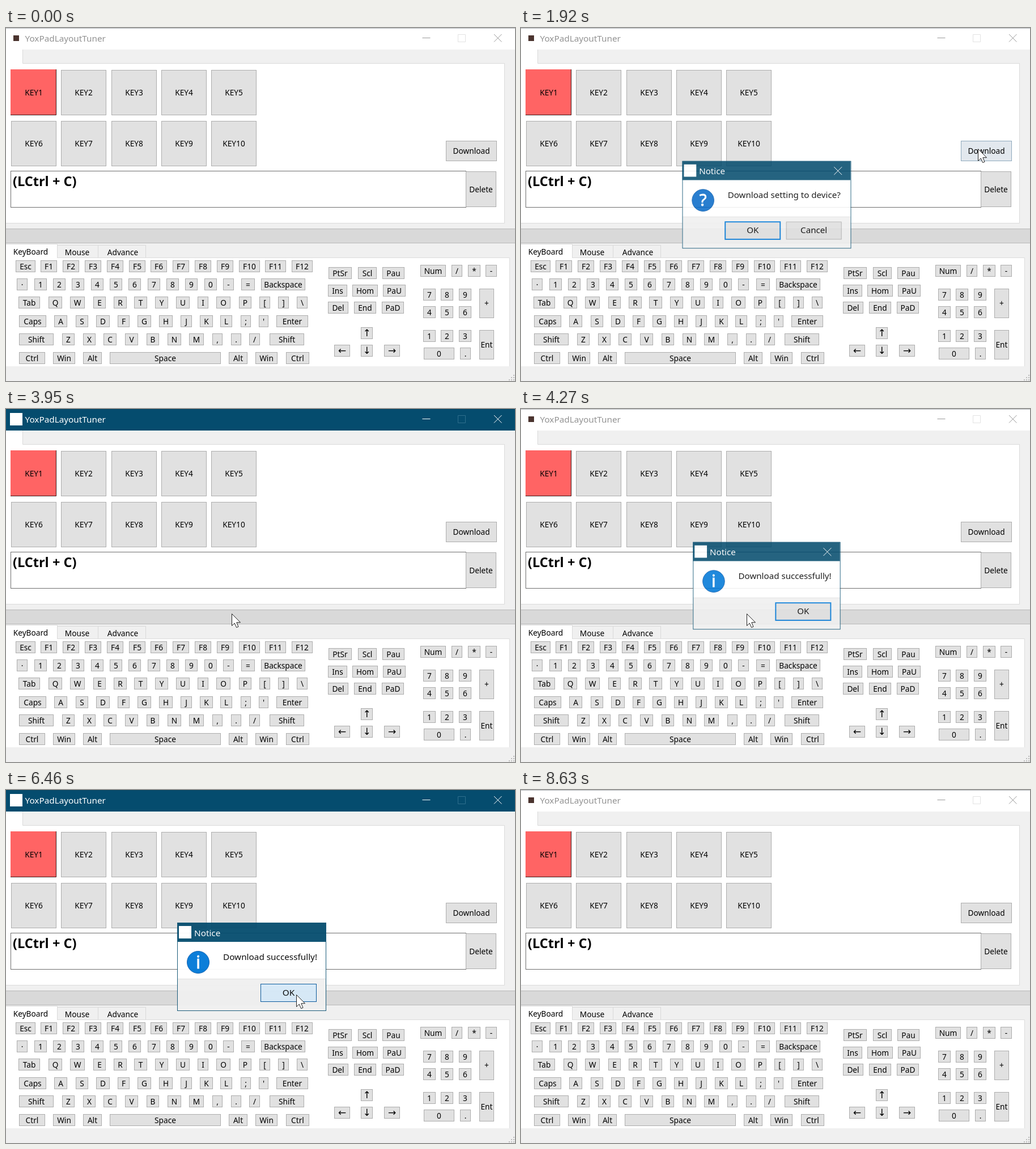
Animation of 898x623 px, one loop 8.72 s. Source, as an HTML page:

```html
<!DOCTYPE html>
<html lang="en">
<head>
<meta charset="utf-8">
<title>YoxPadLayoutTuner</title>
<style>
  html, body { margin: 0; width: 100%; height: 100%; overflow: hidden; background: #f0f0f0; }
  svg { display: block; width: 898px; height: 623px; }
  text { font: 13.7px "Noto Sans", "Open Sans", sans-serif; white-space: pre; }
  .ui { font-size: 15.3px; }
  .mid { text-anchor: middle; }
  .arrow { font: 17px "DejaVu Sans", sans-serif; }
  .entry { font: bold 23.5px "Noto Sans", sans-serif; }
  .sign { font-size: 30px; stroke: #fff; stroke-width: .8px; }
</style>
</head>
<body>
<svg id="stage" viewBox="0 0 898 623"></svg>
<script>
const LOOP = 8720, TICK = 76.6;
const NAVY = '#054c6e', FACE = '#e1e1e1', EDGE = '#adadad';
const stage = document.getElementById('stage');

function add(parent, tag, attrs, content) {
  const node = document.createElementNS('http://www.w3.org/2000/svg', tag);
  set(node, attrs);
  if (content) node.textContent = content;
  return parent.appendChild(node);
}
function set(node, attrs) {
  for (const name in attrs) node.setAttribute(name, attrs[name]);
}
const fillRect = (p, x, y, width, height, fill) => add(p, 'rect', { x, y, width, height, fill });
const box = (p, x, y, width, height, fill = FACE, stroke = EDGE) =>
  add(p, 'rect', { x: x + .5, y: y + .5, width, height, fill, stroke });
const line = (p, d, stroke) => add(p, 'path', { d, stroke, fill: 'none' });
const label = (p, x, y, content, attrs = {}) => add(p, 'text', { x, y, ...attrs }, content);

function button(p, x, y, w, h, content, cls = 'mid') {
  const face = box(p, x, y, w, h);
  label(p, x + w / 2 + .5, y + h / 2 + 5.5, content, { class: cls });
  return { face, x, y, w, h };
}

// Window frame and title bar
const titleBar = fillRect(stage, 0, 0, 898, 38, '#fff');
const topEdge = line(stage, 'M0 .5H898', '#b4b8bb');
const titleIcon = fillRect(stage, 0, 0, 0, 0, '#fff');
const titleText = label(stage, 33.5, 24, 'YoxPadLayoutTuner', { class: 'ui' });
const minClose = line(stage, 'M734.5 17.5H748.5M861 11L874.5 24.5M874.5 11L861 24.5', '#999');
const maximize = line(stage, 'M797.5 11.5H810.5V24.5H797.5Z', '#ddd');

// Upper page
fillRect(stage, 0, 38, 29, 25, '#fff');
fillRect(stage, 0, 62, 879, 282, '#fff');
line(stage, 'M29.5 38V62.5H879.5V344.5H0', '#dadada');
for (let i = 0; i < 10; i++) {
  const x = Math.round(9 + (i % 5) * 88.3), y = i < 5 ? 74 : 164;
  const key = button(stage, x, y, 79, 79, 'KEY' + (i + 1));
  if (i === 0) {
    set(key.face, { x: 8, y: 73, width: 81, height: 81, fill: '#ff6464', stroke: 'none' });
    line(stage, 'M8 153.5H88.5V73', '#3a1717');
  }
}
const download = button(stage, 776, 199, 89, 35, 'Download');
box(stage, 8, 252, 803, 64, '#fff', '#6e6e6e');
label(stage, 12, 278.5, '(LCtrl + C)', { class: 'entry' });
button(stage, 811, 253, 53, 62, 'Delete');

// Divider and lower tabs
fillRect(stage, 0, 354, 898, 26, '#d9d9d9');
line(stage, 'M0 354.5H898M0 379.5H898', '#b9b9b9');
fillRect(stage, 0, 405, 889, 192, '#fff');
box(stage, 90, 383, 72, 22, '#f0f0f0', '#d9d9d9');
box(stage, 162, 383, 84, 22, '#f0f0f0', '#d9d9d9');
line(stage, 'M90 405.5H888.5V597', '#dcdcdc');
fillRect(stage, 0, 381, 90, 26, '#fff');
line(stage, 'M0 381.5H90.5V405', '#d9d9d9');
label(stage, 43.5, 399.5, 'KeyBoard', { class: 'mid' });
label(stage, 125.5, 401, 'Mouse', { class: 'mid' });
label(stage, 206, 401, 'Advance', { class: 'mid' });

// Each key is label:centre:width
function keyRow(y, keys, h = 20, cls = 'mid') {
  for (const key of keys.split(' ')) {
    const [name, centre, w] = key.split(':');
    button(stage, Math.round(centre - w / 2), y, +w, h, name, cls);
  }
}
const spread = (names, start, pitch, w) =>
  names.split(' ').map((name, i) => `${name}:${start + i * pitch}:${w}`).join(' ');

keyRow(410, 'Esc:34:34 ' + spread('F1 F2 F3 F4 F5 F6 F7 F8 F9', 75.4, 38.8, 28));
keyRow(410, spread('F10 F11 F12', 428.5, 46.9, 36));
keyRow(442, '·:28:18 ' + spread('1 2 3 4 5 6 7 8 9 0', 60, 33.35, 21) + ' -:392:18 =:426:23 Backspace:488.5:77');
keyRow(474, 'Tab:40.5:37 Q:86:23 W:125:25 E:164:21 R:201:22 T:237:22 Y:273.5:22 U:311:23 I:347:18 O:383:24 P:421:21 [:456:18 ]:489:18 \\:522:18');
keyRow(507, 'Caps:46:47 A:96:22 S:133:21 D:170:23 F:207:20 G:243:23 H:281:23 J:317:19 K:352.5:22 L:388:20 ;:422:17 \':454:16 Enter:504.5:55');
keyRow(539, 'Shift:52.5:60 Z:109:21 X:146:21 C:183:22 V:221:22 B:258:21 N:296:23 M:335:25 ,:372:17 .:405:17 /:438:18 Shift:494.5:60');
keyRow(572, 'Ctrl:45:45 Win:102:38 Alt:152:32 Space:280.5:195 Alt:409:32 Win:459:38 Ctrl:514:40');
keyRow(422, 'PtSr:589:40 Scl:636.5:32 Pau:683:38');
keyRow(453, 'Ins:584.5:33 Hom:633:44 PaU:684.5:39');
keyRow(483, 'Del:585.5:35 End:632.5:38 PaD:682:38');
keyRow(528, '↑:636:20', 20, 'mid arrow');
keyRow(559, '←:592:27 ↓:636:20 →:680:27', 20, 'mid arrow');
keyRow(418, 'Num:753:44 /:794.5:18 *:825:21 -:855:19');
[['7 8 9', 460], ['4 5 6', 491], ['1 2 3', 533]].forEach(([names, y]) => keyRow(y, spread(names, 746.5, 31.4, 21)));
keyRow(564, '0:763.5:53 .:809.5:18');
keyRow(460, '+:847.5:25', 51);
keyRow(533, 'Ent:847.5:25', 51);

// Resize grip
for (let r = 0; r < 3; r++)
  for (let c = 2 - r; c < 3; c++) fillRect(stage, 887 + c * 4, 612 + r * 4, 2, 2, '#bcbcbc');

function makeDialog(x, w, sign, circleFill, message, buttons) {
  const g = add(stage, 'g', {});
  const right = x + w, cx = right - 22.5;
  fillRect(g, x, 268, w, 66, '#fff');
  fillRect(g, x, 334, w, 55, '#f0f0f0');
  line(g, `M${x} 333.5H${right}`, '#dfdfdf');
  fillRect(g, x, 234, w, 34, NAVY);
  box(g, x, 234, w, 155, 'none', '#0f5474');
  fillRect(g, x + 3, 240, 22, 22, '#fff');
  label(g, x + 30, 257.5, 'Notice', { class: 'ui', fill: '#fff' });
  const cross = line(g, `M${cx - 7} 244.5l14 14m0 -14l-14 14`, '#fff');
  add(g, 'circle', { cx: x + 37, cy: 304, r: 19.5, fill: circleFill, stroke: '#0a5cae' });
  label(g, x + 37, 314.5, sign, { class: 'mid sign', fill: '#fff' });
  label(g, x + 81, 300, message, { class: 'ui' });
  const ok = button(g, right - (buttons.length > 1 ? 224 : 115), 342, 98, 31, buttons[0], 'mid ui');
  if (buttons[1]) button(g, right - 115, 342, 98, 31, buttons[1], 'mid ui');
  return { g, ok, cross, cx: x + w / 2 };
}
const dialogs = [
  { ...makeDialog(283, 300, '?', '#0a6cc9', 'Download setting to device?', ['OK', 'Cancel']), open: 1770, press: 3630, close: 3790 },
  { ...makeDialog(302, 262, 'i', '#0078d7', 'Download successfully!', ['OK']), open: 4120, press: 6380, close: 6460 }
];
const pointer = add(stage, 'path', {
  d: 'M.5 .5V21.5L5.3 17L8.6 24.6L12 23.2L8.8 15.7H15.5Z',
  fill: '#fff', stroke: '#222', 'stroke-linejoin': 'round'
});

// Pointer strokes: start, end, steps, destination, easing
const smooth = u => u * u * (3 - 2 * u);
const linear = u => u;
const strokes = [
  [70, 210, 3, [558, 341], linear],
  [440, 1290, 12, [803, 214], smooth],
  [1370, 1370, 1, [806, 213], linear],
  [2150, 2850, 10, [389, 369], smooth],
  [3000, 3080, 2, [397, 363], linear],
  [3250, 3250, 1, [398, 361], linear],
  [4830, 5190, 6, [517, 372], smooth],
  [5350, 5520, 3, [511, 363], linear],
  [5980, 6060, 2, [512, 361], linear],
  [6840, 7620, 11, [905, 655], u => u ** 1.5]
];
function pointerAt(t) {
  let at = [896, 730];
  for (const [start, end, steps, to, ease] of strokes) {
    if (t < start) break;
    const step = steps > 1 ? Math.floor((t - start) / (end - start) * (steps - 1) + .1) : 0;
    const u = ease(Math.min(1, (step + 1) / steps));
    at = at.map((v, i) => Math.round(v + (to[i] - v) * u));
  }
  return at;
}

const inside = (b, [x, y]) => x >= b.x && x <= b.x + b.w && y >= b.y && y <= b.y + b.h;
const between = (t, a, b) => t >= a && t < b;
const ticks = (t, from) => Math.floor((t - from + 8) / TICK);
const STYLES = {
  normal: { fill: FACE, stroke: EDGE, 'stroke-width': 1 },
  focus: { fill: FACE, stroke: '#0078d7', 'stroke-width': 2 },
  hover: { fill: '#e5f1fb', stroke: '#0078d7', 'stroke-width': 1 },
  fading: { fill: '#e2e8ee', stroke: '#8fa9bd', 'stroke-width': 1 },
  pressed: { fill: '#d6e9f8', stroke: '#005499', 'stroke-width': 1 }
};

function drawTitle(active) {
  set(titleBar, { fill: active ? NAVY : '#fff' });
  set(topEdge, { stroke: active ? '#0a4560' : '#b4b8bb' });
  set(titleIcon, active
    ? { x: 7, y: 7, width: 22, height: 22, fill: '#fff' }
    : { x: 13, y: 13, width: 10, height: 10, fill: '#4b342f' });
  set(titleText, { fill: active ? '#fff' : '#929292' });
  set(minClose, { stroke: active ? '#fff' : '#999' });
  set(maximize, { stroke: active ? '#2f6f8d' : '#e2e2e2' });
}

function drawDialog(d, t, at) {
  const closing = t >= d.close;
  const levels = closing ? [.95, .4, 0] : [.25, .6, .87, 1];
  const scales = closing ? [1, .97, .95] : [.96, .975, .99, 1];
  const i = Math.min(levels.length - 1, ticks(t, closing ? d.close : d.open));
  const opacity = t < d.open ? 0 : levels[i];
  set(d.g, {
    opacity,
    display: opacity ? 'inline' : 'none',
    transform: `translate(${d.cx} 312) scale(${scales[Math.max(0, i)]}) translate(${-d.cx} -312)`
  });
  set(d.cross, { visibility: closing ? 'hidden' : 'visible' });
  set(d.ok.face, STYLES[t >= d.press ? 'pressed' : inside(d.ok, at) ? 'hover' : 'focus']);
}

function draw(t) {
  const at = pointerAt(t);
  drawTitle(between(t, 1610, 1770) || between(t, 3790, 4120) || between(t, 6460, 8630));
  let state = 'normal';
  if (between(t, 1610, 1770)) state = 'pressed';
  else if (between(t, 1840, 2000)) state = 'fading';
  else if (t < 1840 && inside(download, at)) state = 'hover';
  set(download.face, STYLES[state]);
  dialogs.forEach(d => drawDialog(d, t, at));
  set(pointer, { transform: `translate(${at})` });
}

const began = performance.now();
function loop() {
  draw((performance.now() - began) % LOOP);
  requestAnimationFrame(loop);
}
loop();
</script>
</body>
</html>
```
